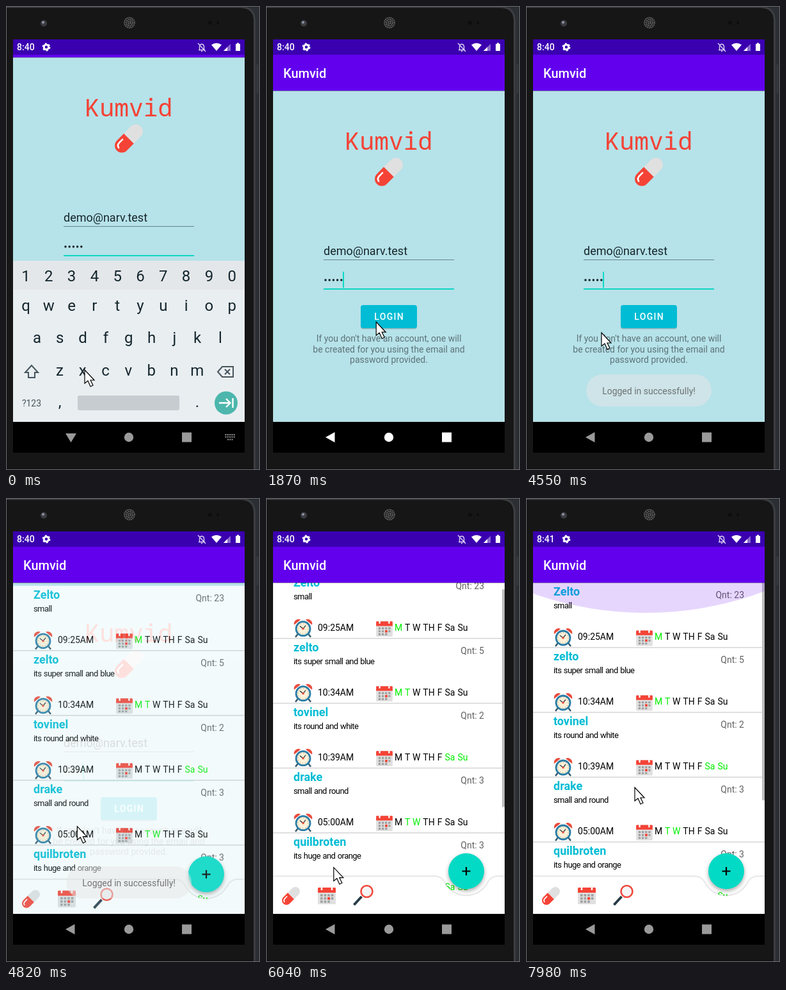
Animation of 397x723 px, one loop 8000 ms. Source, as an HTML page:

```html
<!DOCTYPE html>
<html lang="en">
<head>
<meta charset="utf-8">
<title>Medication reminder</title>
<style>
  html, body { margin: 0; height: 100%; overflow: hidden; background: #2b2e32; }
  svg { display: block; width: 100vw; height: 100vh; }
  text { font: 14px Roboto, sans-serif; }
  .mid { text-anchor: middle; }
  .bar { font-size: 20px; font-weight: 500; fill: #fff; }
  .logo { font: 38px "Noto Sans Mono", monospace; fill: #f44336; }
  .med { font-size: 18px; font-weight: 700; fill: #00bcd4; }
  .desc { font-size: 13px; letter-spacing: -.6px; word-spacing: .9px; }
  .days { word-spacing: .55px; }
  .key { font-size: 24px; fill: #14262e; text-anchor: middle; }
  .line { fill: none; stroke: #46555c; stroke-width: 2; }
</style>
</head>
<body>
<svg viewBox="0 0 397 723">
  <defs>
    <clipPath id="appClip"><path d="M11 52H373V648H11Z"/></clipPath>
    <clipPath id="listClip"><path d="M11 132H373V648H11Z"/></clipPath>
    <clipPath id="buttonClip"><rect x="148" y="466" width="88" height="36" rx="4"/></clipPath>
    <g id="pill" transform="rotate(-45)">
      <path d="M0 -11H-15.5A11 11 0 0 0 -15.5 11H0Z" fill="#f44336"/>
      <path d="M0 -11H15.5A11 11 0 0 1 15.5 11H0Z" fill="#e0e0e0"/>
      <path d="M-21.5 -1Q-20.5 -6 -15 -6H-8" fill="none" stroke="#fff" stroke-width="2.6" stroke-linecap="round"/>
    </g>
    <g id="calendar">
      <rect x="-14" y="-12" width="28" height="26" rx="1.5" fill="#e0e0e0"/>
      <path d="M-14 -4V-10.5Q-14 -12 -12.5 -12H12.5Q14 -12 14 -10.5V-4Z" fill="#f44336"/>
      <path d="M-8 -14V-8M8 -14V-8" stroke="#fff" stroke-width="2.5"/>
      <path d="M-10 0H11M-10 5H11M-10 10H6" stroke="#9e9e9e" stroke-width="3.4" stroke-dasharray="3.6 2"/>
      <rect x="1.2" y="3" width="4" height="4" fill="#f44336"/>
    </g>
    <g id="alarm">
      <path d="M-8 9L-12 14M8 9L12 14" stroke="#37596b" stroke-width="2.5"/>
      <path d="M-14 -5A7 7 0 0 1 -4 -13ZM14 -5A7 7 0 0 0 4 -13Z" fill="#e94b3c"/>
      <circle cy="1" r="11" fill="#fdf1d8" stroke="#2b7da6" stroke-width="2.8"/>
      <circle cy="1" r="8" fill="none" stroke="#8a8a80" stroke-dasharray="1 3.19"/>
      <path d="M-5 -3L0 1L4 -4" fill="none" stroke="#37474f" stroke-width="1.4"/>
      <circle cy="1" r="1.7" fill="#e94b3c"/>
    </g>
  </defs>

  <!-- phone body -->
  <path d="M-5 1.5H367Q388.500 2 388.500 23V730H-5Z" fill="#161617" stroke="#3c3d40" stroke-width="3"/>
  <rect x="391" y="91" width="4" height="45" rx="1" fill="#34373b"/>
  <rect x=".5" y=".5" width="396" height="722" fill="none" stroke="#6c6d70"/>
  <circle cx="59" cy="27" r="5" fill="#3c3d42"/><circle cx="58" cy="25.5" r="2" fill="#9095a8"/>
  <circle cx="193" cy="26" r="9" fill="#292929"/>
  <g fill="none" stroke="#777" stroke-width="1.5" stroke-dasharray="1.5 1.5">
    <circle cx="193" cy="26" r="8"/><circle cx="193" cy="26" r="5"/><circle cx="193" cy="26" r="2"/>
  </g>
  <circle cx="319" cy="26" r="3" fill="#0d0d0e"/><circle cx="331" cy="26" r="2" fill="#0d0d0e"/>

  <g clip-path="url(#appClip)">
    <g id="app">
      <path d="M11 132H373V760H11Z" fill="#b6e2e9"/>
      <text class="logo mid" x="192" y="224">Kumvid</text>
      <use href="#pill" transform="translate(192 258.5)"/>
      <text x="90" y="388" style="font-size:18px" fill="#15262a">demo@narv.test</text>
      <path d="M90 395.5H294" stroke="#66858a"/>
      <path d="M93 427H119" stroke="#15262a" stroke-width="3.6" stroke-linecap="round" stroke-dasharray="0 6.2"/>
      <path d="M90 441H294" stroke="#0fd5c4" stroke-width="2"/>
      <path id="caret" d="M121 414V439" stroke="#03dac5" stroke-width="2"/>
      <rect x="148" y="467.5" width="88" height="36" rx="4" fill="#0003"/>
      <rect x="148" y="466" width="88" height="36" rx="4" fill="#00bcd4"/>
      <circle id="ripple" cx="175" cy="482" fill="#fff" clip-path="url(#buttonClip)"/>
      <text class="mid" x="192.6" y="489" fill="#fff" style="font-weight:500;letter-spacing:1.25px">LOGIN</text>
      <g class="mid" fill="#5d7478">
        <text x="192" y="523">If you don't have an account, one will</text>
        <text x="192" y="539.5">be created for you using the email and</text>
        <text x="192" y="556">password provided.</text>
      </g>
      <path d="M11 70H373V132H11Z" fill="#6200ee"/>
      <text class="bar" x="27" y="112">Kumvid</text>
    </g>

    <g id="list" clip-path="url(#listClip)">
      <path d="M11 100H373V648H11Z" fill="#fff"/>
      <g id="rows"></g>
      <path id="scrollbar" d="M371 132V471" stroke="#bdbdbd" stroke-width="4"/>
      <ellipse id="glow" cx="187" rx="434" fill="#6200ee" opacity=".16"/>
      <path d="M11 590H264C272 590 276 594 280 601A38 38 0 0 0 346 601C350 594 354 590 362 590H373V650H11Z"
        fill="#fff" style="filter:drop-shadow(0 0 1.5px #0005)"/>
      <use href="#pill" transform="translate(39 620) scale(.64)"/>
      <use href="#calendar" transform="translate(95 619)"/>
      <path d="M149.5 621L137.5 634" stroke="#263b45" stroke-width="4"/>
      <circle cx="157.5" cy="613" r="9" fill="#f5f5f5" stroke="#f0483d" stroke-width="2.6"/>
      <circle cx="313" cy="581.5" r="28" fill="#03dac5" style="filter:drop-shadow(0 3px 3px #0005)"/>
      <path d="M306.5 581.5H319.5M313 575V588" stroke="#000" stroke-width="2.2"/>
    </g>
    <path id="barShadow" d="M11 132.5H373" stroke="#0004"/>

    <g id="keyboard">
      <path d="M11 397H373V648H11Z" fill="#e9eef1"/>
      <path d="M11 397H373V442H11Z" fill="#e4e7e9"/>
      <g id="keys"></g>
      <path class="line" d="M40 560L30 571H35V579H45V571H50Z"/>
      <path class="line" d="M331 570L338 562H355V578H338ZM342 566L350 574M350 566L342 574"/>
      <text class="mid" x="40" y="624" fill="#46555c">?123</text>
      <text class="key" x="84" y="625">,</text>
      <text class="key" x="299" y="625">.</text>
      <rect x="112" y="607" width="159" height="23" rx="3" fill="#c7ccd0"/>
      <circle cx="344" cy="618.5" r="18" fill="#4db6ac"/>
      <path d="M333 618.5H350M344 612L350.5 618.5L344 625M354.5 611V626" fill="none" stroke="#fff" stroke-width="2.4"/>
    </g>

    <g id="toast">
      <rect x="94" y="574" width="196" height="50" rx="25" fill="#e6e6e6" fill-opacity=".55"/>
      <text class="mid" x="192" y="605" fill="#666">Logged in successfully!</text>
    </g>

    <!-- status bar -->
    <path d="M11 52H373V76H11Z" fill="#3a00b0"/>
    <text id="clock" x="17" y="69" fill="#fff" style="font-weight:500"></text>
    <circle cx="63" cy="64" r="3.7" fill="none" stroke="#fff" stroke-width="3"/>
    <circle cx="63" cy="64" r="5.6" fill="none" stroke="#fff" stroke-width="1.6" stroke-dasharray="2.9 2.96"/>
    <path d="M301 68.5H311M302.5 68V63Q303 59.5 306 59.5T309.5 63V68M300 58L312 71M305 70.5H307" fill="none" stroke="#ddd0f5" stroke-width="1.4"/>
    <path d="M321 60.5Q329 55 337 60.5L329 70Z" fill="#fff"/>
    <path d="M340 70L351 59V70Z" fill="#8c6bd0"/><path d="M340 70L346 64V70Z" fill="#fff"/>
    <path d="M359 59H361V57.5H364V59H366V70H359Z" fill="#fff"/>
  </g>

  <!-- navigation bar -->
  <path d="M11 648H373V696H11Z" fill="#000"/>
  <g id="nav">
    <path id="back"/>
    <circle cx="192" cy="672" r="7.2"/>
    <path d="M275 664.5H290V679.5H275Z"/>
    <path id="imeIcon" d="M342.5 668H358M342.5 671.5H358M346 675.5H355" stroke="#9a9a9a" stroke-width="2" stroke-dasharray="2 1.3"/>
  </g>
  <path id="mouse" d="M0 0V21L5 17L9 26L13 24L9 16H15Z" fill="#fff" stroke="#000" stroke-width="1.2"/>
</svg>
<script>
const $ = id => document.getElementById(id);
const LOOP = 8000;

const DAYS = ['M', 'T', 'W', 'TH', 'F', 'Sa', 'Su'];
const MEDS = [
  ['Zelto', 'small', 23, '09:25AM', 'M'],
  ['zelto', 'its super small and blue', 5, '10:34AM', 'M T'],
  ['tovinel', 'its round and white', 2, '10:39AM', 'Sa Su'],
  ['drake', 'small and round', 3, '05:00AM', 'T W'],
  ['quilbroten', 'its huge and orange', 3, '08:15AM', 'Sa Su']
];

$('rows').innerHTML = MEDS.map(([name, desc, count, time, on], i) => {
  const active = on.split(' ');
  const days = DAYS.map(d => `<tspan fill="${active.includes(d) ? '#00ee00' : '#000'}">${d}</tspan>`).join(' ');
  return `<g transform="translate(0 ${132 + 101 * i})">
    <text class="med" x="43" y="20">${name}</text>
    <text class="desc" x="43" y="40">${desc}</text>
    <text x="341" y="24" text-anchor="end" fill="#606060">Qnt: ${count}</text>
    <use href="#alarm" transform="translate(58 85)"/>
    <text x="81" y="89">${time}</text>
    <use href="#calendar" transform="translate(185 85.5) scale(.92)"/>
    <text class="days" x="201" y="89">${days}</text>
    <path d="M11 101H373" stroke="#d6d6d6" stroke-width="1.5"/></g>`;
}).join('');

$('keys').innerHTML = [['1234567890', 31, 429], ['qwertyuiop', 31, 475], ['asdfghjkl', 48.5, 525], ['zxcvbnm', 84, 576]]
  .map(([row, x, y]) => [...row].map((c, i) => `<text class="key" x="${x + 35.8 * i}" y="${y}">${c}</text>`).join(''))
  .join('');

const BEATS = [320, 730, 1440, 3240, 4550, 5330, 6700, 7980, 8120];
function snap(t) {
  if (t < BEATS[0]) return 0;
  const i = BEATS.findIndex(b => b > t) - 1, a = BEATS[i], span = BEATS[i + 1] - a;
  const n = Math.round(span / 140);
  return a + Math.floor((t - a) / span * n + 1e-6) / n * span;
}

// Linear interpolation through [time, ...values] points.
function track(points, t) {
  const i = points.findIndex(p => p[0] > t);
  if (i < 0) return points[points.length - 1].slice(1);
  if (!i) return points[0].slice(1);
  const a = points[i - 1], b = points[i], k = (t - a[0]) / (b[0] - a[0]);
  return a.slice(1).map((v, j) => v + (b[j + 1] - v) * k);
}

const MOUSE = [[0, 123, 567], [300, 123, 567], [730, 144, 367], [1290, 178, 470], [1440, 178, 470], [1870, 172, 493],
  [2500, 172, 493], [3240, 132, 532], [4550, 118, 509], [5330, 98, 517], [5890, 104, 590], [6300, 110, 543],
  [6700, 113, 593], [6900, 113, 593], [7420, 150, 330], [7980, 170, 451]];
const TOAST = [[2700, 0], [3240, .5], [3560, .9], [5330, .9], [5720, 0]];
const NAV = [[2850, 255], [3240, 180], [3680, 154]];
const SCROLL = [[5890, 0], [6300, 47], [6700, 0]];
const GLOW = [[7420, 0], [7980, 47]];

const show = (id, on) => $(id).setAttribute('visibility', on ? 'inherit' : 'hidden');
const move = (id, x, y) => $(id).setAttribute('transform', `translate(${x} ${y})`);

function draw(now) {
  const t = snap(now % LOOP);
  const typing = t < 440;
  const value = points => track(points, t)[0];

  move('mouse', ...track(MOUSE, t));
  move('app', 0, typing ? -52 : 0);
  move('barShadow', 0, typing ? -52 : 0);
  move('keyboard', 0, value([[320, 0], [620, 251]]));
  show('caret', t >= 1280 && t < 1860 || t >= 2290);

  const press = value([[1400, 0], [1860, 1]]);
  $('ripple').setAttribute('r', 75 * press);
  $('ripple').setAttribute('opacity', press < 1 ? .25 * (1 - press) : 0);

  const enter = value([[4600, 0], [4850, 1]]);
  $('list').setAttribute('opacity', enter);
  move('list', 0, 30 * (1 - enter));
  const scroll = value(SCROLL);
  move('rows', 0, -scroll);
  move('scrollbar', 0, scroll * .74);
  show('scrollbar', t >= 5940);
  const pull = value(GLOW), radius = pull * 7.5;
  $('glow').setAttribute('ry', radius);
  $('glow').setAttribute('cy', 132 + pull - radius);
  $('toast').setAttribute('opacity', value(TOAST));

  const shade = typing ? 154 : value(NAV);
  $('nav').setAttribute('fill', `rgb(${shade},${shade},${shade})`);
  $('back').setAttribute('d', typing ? 'M93 666H110L101.5 680Z' : 'M93 672L107.5 664V680Z');
  show('imeIcon', typing);
  $('clock').textContent = t < 7400 ? '8:40' : '8:41';
}

const start = performance.now();
function frame() {
  draw(performance.now() - start);
  requestAnimationFrame(frame);
}
frame();
</script>
</body>
</html>
```
